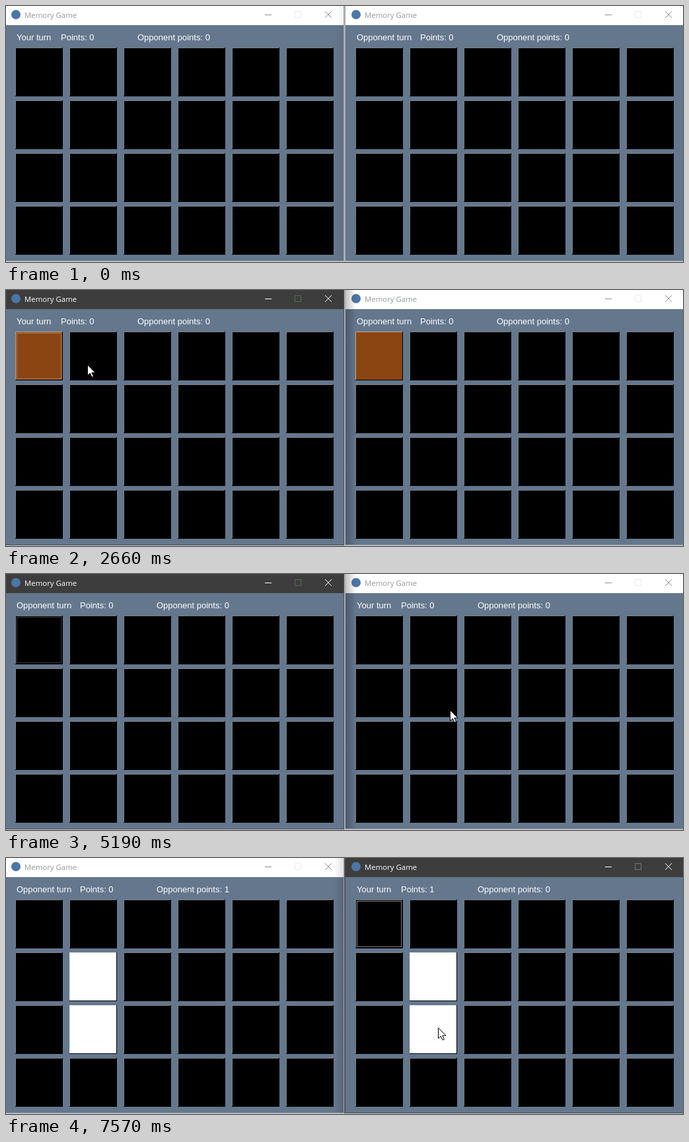
An HTML page with a canvas for the animation above (8000 ms loop, 1025x388 px).

```html
<!DOCTYPE html>
<html lang="en">
<head>
<meta charset="utf-8">
<title>Memory Game</title>
<style>
html, body { margin: 0; width: 100%; height: 100%; overflow: hidden; background: #64778d; }
canvas { display: block; }
</style>
</head>
<body>
<canvas id="stage" width="1025" height="388"></canvas>
<script>
const ctx = document.getElementById('stage').getContext('2d');
const W = 1025, H = 388, LOOP = 8000, OFFSET = 515;

// Moments of the game, in ms
const LEFT_CLICK = 1970, SECOND_CARD = 3230, HIDE = 4330, RIGHT_CLICK = 5700, MATCH = 7300;
const LAG = 100;

const BROWN = { face: '#8b4513', light: '#c5a289' };
const PURPLE = { face: '#800080', light: '#bf7fbf' };
const WHITE = { face: '#ffffff', light: '#e6e6e6' };
const BLACK = { face: '#000000', light: '#7f7f7f' };

// Pointer tip: time, x, y, easing towards this point
const linear = k => k;
const easeOut = k => 1 - (1 - k) ** 2;
const easeInOut = k => k * k * (3 - 2 * k);
const easeIn = k => k ** 1.5;
const path = [
  [620, 693, 376, linear],
  [1200, 38, 114, easeOut],
  [1399, 38, 114, linear],
  [1400, 37, 114, linear],
  [2200, 37, 114, linear],
  [2660, 123, 113, easeInOut],
  [4229, 123, 113, linear],
  [4230, 124, 114, linear],
  [4320, 124, 114, linear],
  [5010, 573, 212, easeIn],
  [5190, 672, 206, easeOut],
  [5250, 676, 203, linear],
  [5440, 664, 184, easeInOut],
  [6030, 664, 184, linear],
  [6470, 673, 207, easeInOut],
  [6860, 654, 257, easeInOut],
  [LOOP, 654, 257, linear]
];

function rect(x, y, w, h, color) {
  ctx.fillStyle = color;
  ctx.fillRect(x, y, w, h);
}

function text(str, x, y, font, color) {
  ctx.font = font;
  ctx.fillStyle = color;
  ctx.fillText(str, x, y);
}

function line(color, ...pts) {
  ctx.strokeStyle = color;
  ctx.lineWidth = 1;
  ctx.beginPath();
  for (let i = 0; i < pts.length; i += 4) {
    ctx.moveTo(pts[i], pts[i + 1]);
    ctx.lineTo(pts[i + 2], pts[i + 3]);
  }
  ctx.stroke();
}

function titleBar(active, boxColor) {
  const ink = active ? '#ffffff' : '#8e8e8e';
  rect(-2, 0, 513, 29, active ? '#3d3d3d' : '#ffffff');
  ctx.fillStyle = '#4b76a6';
  ctx.beginPath();
  ctx.arc(15, 13, 7, 0, Math.PI * 2);
  ctx.fill();
  text('Memory Game', 28, 18, '11.4px "Open Sans", "Noto Sans", sans-serif', active ? '#ffffff' : '#929a92');
  rect(392, 13, 10, 1, ink);
  ctx.strokeStyle = active ? boxColor : '#ececec';
  ctx.lineWidth = 1;
  ctx.strokeRect(437.5, 8.5, 9, 9);
  line(ink, 483, 8, 493, 18, 493, 8, 483, 18);
}

function status(myTurn, points, rival) {
  const font = '13px "Liberation Sans", Arial, sans-serif';
  const shift = myTurn ? 0 : 29;
  text(myTurn ? 'Your turn' : 'Opponent turn', 16, 52, font, '#ffffff');
  text('Points: ' + points, 83 + shift, 52, font, '#ffffff');
  text('Opponent points: ' + rival, 199 + shift, 52, font, '#ffffff');
}

function card(col, row, { face, light }) {
  const x = 14 + col * 82, y = 63 + row * 80;
  rect(x, y, 72, 74, face);
  rect(x, y, 71, 1, light);
  rect(x, y, 1, 73, light);
  rect(x, y + 73, 72, 1, '#000000');
  rect(x + 71, y, 1, 74, '#000000');
}

// Dotted focus ring on the first card
function focusRing(color) {
  for (let x = 16; x <= 83; x++) {
    rect(x, x % 2 ? 65 : 134, 1, 1, color);
  }
  for (let y = 65; y <= 134; y++) {
    rect(y % 2 ? 83 : 16, y, 1, 1, color);
  }
}

// up maps "col,row" to the face of an open card
function gameWindow(x, w) {
  ctx.save();
  ctx.translate(x, 0);
  rect(-2, 29, 513, 357, '#64778d');
  titleBar(w.active, w.box);
  status(w.myTurn, w.points, w.rival);
  for (let row = 0; row < 4; row++) {
    for (let col = 0; col < 6; col++) card(col, row, w.up[col + ',' + row] || BLACK);
  }
  if (w.ring) focusRing(w.ring);
  ctx.restore();
}

function shadow(from, to, alpha) {
  const g = ctx.createLinearGradient(from, 0, to, 0);
  g.addColorStop(0, `rgba(0,0,0,${alpha})`);
  g.addColorStop(1, 'rgba(0,0,0,0)');
  rect(Math.min(from, to), 0, Math.abs(to - from), 386, g);
}

function frameLines(leftOn, rightOn) {
  const edge = on => on ? '#484c52' : '#a2a5a9';
  rect(511, 0, 1, H, edge(leftOn));
  rect(512, 0, 1, H, rightOn ? '#5b5f64' : '#b4b7ba');
  rect(513, 0, 1, H, edge(rightOn));
  rect(0, 386, 512, 1, edge(leftOn));
  rect(513, 386, W - 513, 1, edge(rightOn));
  rect(0, 387, W, 1, '#c6cacf');
}

function pointer(t) {
  if (t < path[0][0]) return;
  const i = path.findIndex(p => p[0] > t);
  const [t0, x0, y0] = path[i - 1], [t1, x1, y1, ease] = path[i];
  const k = ease((t - t0) / (t1 - t0));
  ctx.save();
  ctx.translate(Math.round(x0 + (x1 - x0) * k) + 0.5, Math.round(y0 + (y1 - y0) * k) + 0.5);
  const arrow = new Path2D('M0 0V16.2L3.8 12.6L6.6 18.4L9 17.4L6.3 11.7H11.5Z');
  ctx.fillStyle = '#ffffff';
  ctx.fill(arrow);
  ctx.strokeStyle = '#000000';
  ctx.lineWidth = 1;
  ctx.stroke(arrow);
  ctx.restore();
}

// Open cards as one player sees them; the other side lags behind
function openCards(t, lagFirst, lagSecond) {
  const up = {};
  if (t < HIDE) {
    if (t >= LEFT_CLICK + lagFirst) up['0,0'] = BROWN;
    if (t >= SECOND_CARD + lagFirst) up['1,0'] = PURPLE;
  }
  if (t >= RIGHT_CLICK + lagSecond) up['1,1'] = WHITE;
  if (t >= MATCH + lagSecond * 1.3) up['1,2'] = WHITE;
  return up;
}

function leftRing(t) {
  if (t < LEFT_CLICK || t >= RIGHT_CLICK) return null;
  return t < SECOND_CARD ? '#c3b3a6' : t < HIDE ? '#1c0e04' : '#77726a';
}

function draw(t) {
  const leftOn = t >= LEFT_CLICK && t < RIGHT_CLICK;
  const rightOn = t >= RIGHT_CLICK;
  gameWindow(0, {
    active: leftOn, box: '#5c6b57', myTurn: t < SECOND_CARD,
    points: 0, rival: t >= 7570 ? 1 : 0,
    up: openCards(t, 0, LAG), ring: leftRing(t)
  });
  gameWindow(OFFSET, {
    active: rightOn, box: '#747474', myTurn: t >= HIDE,
    points: t >= MATCH ? 1 : 0, rival: 0,
    up: openCards(t, LAG, 0), ring: rightOn ? '#ffffff' : null
  });
  if (leftOn) shadow(514, 530, 0.24);
  else shadow(511, 497, rightOn ? 0.12 : 0.05);
  frameLines(leftOn, rightOn);
  pointer(t);
}

const start = performance.now();
function tick() {
  draw((performance.now() - start) % LOOP);
  requestAnimationFrame(tick);
}
tick();
</script>
</body>
</html>
```
